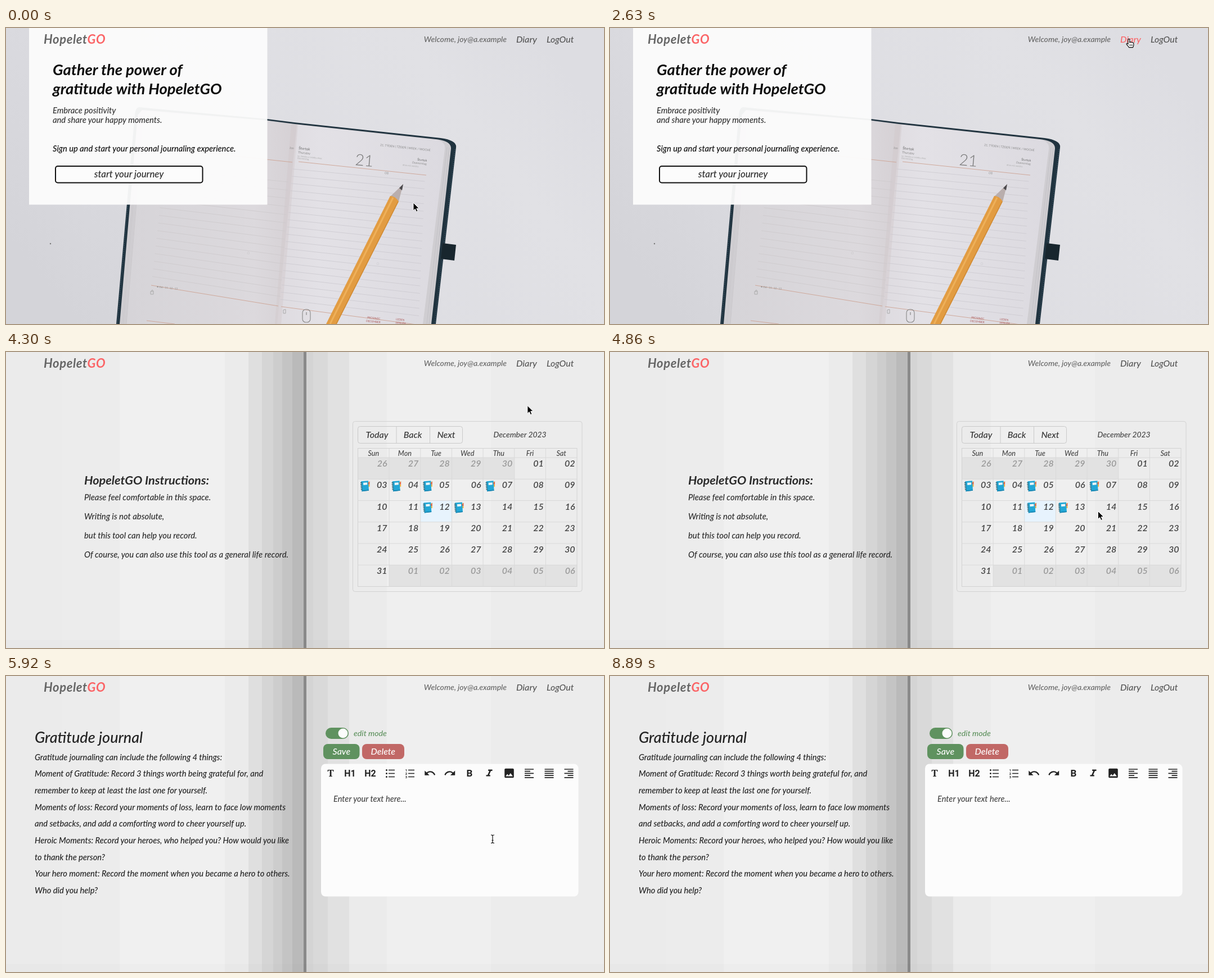
Recreate the animation shown at these times as an HTML page. Size 1063 px wide and 527 px high, loop 8940 ms.

```html
<!DOCTYPE html>
<html lang="en">
<head>
<meta charset="utf-8">
<title>Journal walkthrough</title>
<style>
  html, body { margin: 0; width: 100%; height: 100%; overflow: hidden; background: #ececec; }
  svg { display: block; width: 1063px; height: 527px; font: italic 500 15px Lato, "Open Sans", sans-serif; }
  .icon { font-family: Roboto, Inter, sans-serif; font-style: normal; font-weight: 700; }
  .serif { font-family: "Noto Serif", serif; font-style: normal; font-weight: 600; }
  .print { font-style: normal; font-weight: 400; }
</style>
</head>
<body>
<svg id="stage" viewBox="0 0 1063 527" xmlns="http://www.w3.org/2000/svg"></svg>
<script>
const LOOP = 8940;
const DIARY_AT = 2870, EVENTS_AT = 3880, JOURNAL_AT = 5920;
const HOVER_AT = 2060, BEAM_AT = 5860, GONE_AT = 8410;
const BRAND = 'Hopelet', SUFFIX = 'GO';

// time, x, y of the pointer's hot spot
const PATH = [
  [0, 724, 311], [170, 724, 311], [420, 744, 284], [750, 800, 204], [1030, 842, 134],
  [1400, 886, 65], [1840, 920, 20], [2060, 921, 19], [2300, 922, 19], [3880, 922, 22],
  [4060, 926, 55], [4300, 927, 95], [4500, 908, 175], [4750, 870, 269], [4920, 866, 291],
  [5280, 866, 291], [5400, 862, 291], [5510, 865, 291], [5859, 865, 291], [5860, 865, 290],
  [7419, 865, 290], [7420, 865, 292], [7950, 865, 292], [8130, 903, 362], [8410, 990, 527]
];

const text = (x, y, size, str, fill = '#2b2b2b', extra = '') =>
  `<text x="${x}" y="${y}" font-size="${size}" fill="${fill}" ${extra}>${str}</text>`;
const rect = (x, y, w, h, fill, extra = '') =>
  `<rect x="${x}" y="${y}" width="${w}" height="${h}" fill="${fill}" ${extra}/>`;
const path = (d, fill, extra = '') => `<path d="${d}" fill="${fill}" ${extra}/>`;
const stroke = (d, color, width = 1, extra = '') =>
  `<path d="${d}" fill="none" stroke="${color}" stroke-width="${width}" ${extra}/>`;
const group = (id, body, extra = '') => `<g id="${id}" ${extra}>${body}</g>`;
const range = n => [...Array(n).keys()];
const BOLD = 'font-weight="700"', MID = 'text-anchor="middle"', END = 'text-anchor="end"';

function ruledLines() {
  let left = '', right = '';
  for (const i of range(19)) {
    const y = 251 + i * 12.9;
    const x = 517 - (y - 170) * 0.094;
    right += `M${x} ${y}L${745 - (y - 240) * 0.045} ${y + 22 + i * 0.4}`;
  }
  for (const i of range(15)) {
    const y = 252 + i * 13.6;
    const slope = 0.1 + i * 0.004;
    const x = 281 - (y - 252) * 0.11, end = 502 - (y - 252) * 0.07;
    left += `M${x} ${y}L${end} ${y + (end - x) * slope}`;
  }
  return stroke(left, '#cdc9cc', 0.8) + stroke(right, '#cccad0', 0.8);
}

function notebook() {
  const tiny = (x, y, str, size = 5, fill = '#888', turn = 6) =>
    text(x, y, size, str, fill, `class="print" transform="rotate(${turn} ${x} ${y})"`);
  return path('M236 141L464 162 512 168 773 196Q802 200 800 213L764 527H196L229 155Q230 142 236 141Z', '#20333f')
    + stroke('M798 216L762 527M230 160L198 527', '#3b5566', 1.2, 'stroke-dasharray="1.5 2"')
    + path('M242 146L464 164.5 514 171 768 198.5Q792 202 791 215L756 527H202L234 155Z', '#cfcdd1')
    + path('M250 150L464 166 517 173 484 527H214L244 158Z', 'url(#leftPage)')
    + path('M517 172L765 199Q782 202 780 216L741 527H482Z', 'url(#rightPage)')
    + stroke('M784 212L748 527M788 213L752 527', '#c1bfc5', 0.8)
    + stroke('M227 300L208 527M233 300L214 527', '#c9c7cb', 0.8)
    + path('M507 172L519 172 489 527H478Z', '#cfc6c8', 'opacity=".4"')
    + ruledLines()
    + stroke('M280 214L509 239M520 238L747 262M258 458L484 495M489 496L737 529M250 521L300 527', '#cda393', 0.9)
    + text(620, 244, 28, '21', '#777', 'class="print" style="font-weight:300" transform="rotate(5 620 244)"')
    + tiny(665, 210, '21. TÝDEN | TŽDEŇ | WEEK / WOCHE', 5.2)
    + tiny(520, 216, 'Štvrtok', 6.4, '#666') + tiny(519, 223, 'Thursday', 5.4)
    + tiny(518, 229, 'sv. meniny a sviatky dnes', 4, '#aaa') + tiny(518, 233, 'Donnerstag', 4, '#aaa')
    + tiny(731, 236, 'Štvrtok', 5.4, '#666') + tiny(722, 241, 'Donnerstag', 5) + tiny(705, 245, 'dnes má meniny', 4, '#aaa')
    + tiny(673, 260, '08', 6, '#999') + tiny(428, 403, '◌', 8, '#aaa') + tiny(658, 422, '◌', 8, '#aaa')
    + tiny(504, 215, 'žen', 5) + tiny(268, 462, '●  tlač · 11 · 12 · 13', 4.5, '#888')
    + tiny(642, 517, 'PROSINEC', 4.8, '#a55') + tiny(640, 523, 'DECEMBER', 4.8, '#a55')
    + tiny(693, 520, 'LEDEN', 4.8, '#a55') + tiny(692, 526, 'JANUÁR', 4.8, '#a55')
    + rect(527, 501, 14, 23, 'none', 'rx="6" stroke="#888" stroke-width="1.1"') + stroke('M534 506V511', '#777')
    + stroke('M257 474v-5h5v5zM258 469q2-5 4 0M493 508v-6l4-1v7z', '#aaa')
    + path('M776 383L800 386 797 414 773 411Z', '#18262e')
    + path('M683 300L706 278 698 309Z', '#b9aead') + path('M699 285L706 278 704 289Z', '#4b494c')
    + path('M683 299Q692 299 698 309L588 527H569Z', '#e29c42')
    + stroke('M688 302L576 527', '#eeb05a', 3) + stroke('M697 309L587 527', '#cf8b36', 1.5);
}

function home() {
  return rect(0, 0, 1063, 527, 'url(#desk)') + notebook()
    + `<circle cx="79" cy="384" r="1.2" fill="#777"/>`
    + rect(41, 0, 423.5, 314.5, '#fcfcfc', 'opacity=".95"')
    + text(83, 84, 27.4, 'Gather the power of', '#0c0c0c', BOLD)
    + text(83, 118, 27.4, `gratitude with ${BRAND}${SUFFIX}`, '#0c0c0c', BOLD)
    + text(83, 152, 14.7, 'Embrace positivity', '#333') + text(83, 169, 14.7, 'and share your happy moments.', '#333')
    + text(83, 220, 14.65, 'Sign up and start your personal journaling experience.', '#0c0c0c')
    + rect(88, 246, 261.5, 29.5, '#fcfcfc', 'rx="4" stroke="#111" stroke-width="2"')
    + text(218.5, 266, 16.8, 'start your journey', '#2b2b2b', MID);
}

function pages() {
  const bands = [
    [0, '#ebebeb'], [100, '#ececec'], [202, '#f0f0f0'], [389, '#ebebeb'], [431, '#dfdfdf'], [455, '#d5d5d5'],
    [475, '#cdcdcd'], [491, '#c4c4c4'], [509, '#bababa'], [529, '#8a8a8a'], [534, '#d4d4d4'], [546, '#d9d9d9'],
    [572, '#e1e1e1'], [610, '#ebebeb'], [677, '#efefef'], [862, '#ececec'], [1063]
  ];
  return bands.slice(0, -1).map(([x, c], i) => rect(x, 0, bands[i + 1][0] - x, 527, c)).join('')
    + rect(0, 513, 1063, 14, '#000', 'opacity=".012"');
}

const colX = c => 625.5 + c * 55.64;
const rowY = r => 188 + r * 38.25;

function calendar() {
  const tone = '#d2d2d2';
  let days = '', fills = '', books = '';
  for (const i of range(42)) {
    const c = i % 7, r = Math.floor(i / 7);
    const out = i < 5 || i > 35;
    const n = i < 5 ? 26 + i : i > 35 ? i - 35 : i - 4;
    if (out || n === 12) fills += rect(colX(c), rowY(r), 55.64, 38.25, out ? '#e2e2e2' : '#e7f3fd');
    days += text(colX(c + 1) - 3.5, rowY(r) + 16, 16, String(n).padStart(2, '0'), out ? '#999' : '#444', END + ' font-weight="600"');
    if (!out && [3, 4, 5, 7, 12, 13].includes(n))
      books += `<use href="#book" x="${colX(c) + 2.5}" y="${rowY(r) + 1.5}"/>`;
  }
  const grid = range(6).map(c => `M${colX(c + 1)} 171.5V417.5`).join('') + range(6).map(r => `M625.5 ${rowY(r)}H1015`).join('');
  const heads = ['Sun', 'Mon', 'Tue', 'Wed', 'Thu', 'Fri', 'Sat']
    .map((d, c) => text(colX(c + 0.5), 184.5, 12.7, d, '#444', MID)).join('');
  const lines = ['Please feel comfortable in this space.', 'Writing is not absolute,', 'but this tool can help you record.',
    'Of course, you can also use this tool as a general life record.'];
  return text(139, 236, 21.7, `${BRAND}${SUFFIX} Instructions:`, '#2b2b2b', BOLD)
    + lines.map((s, i) => text(139, 264 + i * 34, 14.8, s)).join('')
    + rect(616.5, 123.5, 407.5, 303, 'none', `rx="4" stroke="${tone}"`)
    + rect(625.5, 132.5, 186, 30, 'none', 'rx="4" stroke="#c9c9c9"') + stroke('M694 132.5V162.5M753.5 132.5V162.5', '#c9c9c9')
    + text(659.5, 153, 16, 'Today', '#333', MID) + text(723, 153, 16, 'Back', '#333', MID) + text(782.5, 153, 16, 'Next', '#333', MID)
    + text(913.5, 152, 13.9, 'December 2023', '#444', MID)
    + fills + rect(625.5, 171.5, 389.5, 246, 'none', `stroke="${tone}"`) + stroke(grid, '#d9d9d9')
    + heads + days + group('events', books);
}

function toolbar() {
  const ink = '#222';
  const rules = (x, widths, side) => stroke(widths.map((w, i) => {
    const from = side === 'end' ? x + 8 - w : x - 8;
    return `M${from} ${166 + i * 3.7}h${w}`;
  }).join(''), ink, 1.7);
  const glyph = (x, d, flip = 1) => path(d, ink, `transform="translate(${x} 173) scale(${0.92 * flip} .92) translate(-12 -12)"`);
  const undo = 'M12.5 8c-2.65 0-5.05.99-6.9 2.6L2 7v9h9l-3.62-3.62c1.39-1.16 3.16-1.88 5.12-1.88 3.54 0 6.55 2.31 7.6 5.5l2.37-.78C21.08 11.03 17.15 8 12.5 8z';
  const slant = 'M10 5v2.6h2.2l-3.4 7.8H6V18h8v-2.6h-2.2l3.4-7.8H18V5z';
  const picture = 'M21 19V5c0-1.1-.9-2-2-2H5c-1.1 0-2 .9-2 2v14c0 1.1.9 2 2 2h14c1.1 0 2-.9 2-2zM8.5 13.5l2.5 3L14.5 12l4.5 6H5z';
  const label = (x, s, size, cls = 'icon') => text(x, 179, size, s, ink, `${MID} class="${cls}"`);
  const items = 'M680 167.5h11M680 173.5h11M680 179.5h11';
  return label(577, 'T', 17, 'serif') + label(611.5, 'H1', 16) + label(647.5, 'H2', 16)
    + stroke(items, ink, 1.7) + range(3).map(i => `<circle cx="676.5" cy="${167.5 + i * 6}" r="1.5" fill="${ink}"/>`).join('')
    + stroke(items, ink, 1.7, 'transform="translate(35)"')
    + range(3).map(i => text(711.5, 169.5 + i * 6, 6, i + 1, ink, `${MID} class="icon"`)).join('')
    + glyph(753.5, undo) + glyph(789, undo, -1)
    + label(824, 'B', 17) + glyph(859, slant) + glyph(894.5, picture)
    + rules(930, [16, 10, 16, 10, 16]) + rules(965.5, [16, 16, 16, 16, 16]) + rules(1000.5, [16, 10, 16, 10, 16], 'end');
}

function journal() {
  const lines = ['Gratitude journaling can include the following 4 things:',
    'Moment of Gratitude: Record 3 things worth being grateful for, and', 'remember to keep at least the last one for yourself.',
    'Moments of loss: Record your moments of loss, learn to face low moments', 'and setbacks, and add a comforting word to cheer yourself up.',
    'Heroic Moments: Record your heroes, who helped you? How would you like', 'to thank the person?',
    'Your hero moment: Record the moment when you became a hero to others.', 'Who did you help?'];
  const green = '#5f925f';
  return text(51, 119, 27, 'Gratitude journal', '#222')
    + lines.map((s, i) => text(51, 149.5 + i * 29.7, 14.65, s, '#222')).join('')
    + rect(568, 92, 41, 20, green, 'rx="10"') + '<circle cx="599" cy="102" r="8.5" fill="#fcfcfc"/>'
    + text(618, 106.5, 14.2, 'edit mode', green)
    + rect(564, 121, 64.5, 27, green, 'rx="8"') + text(596.3, 140, 16, 'Save', '#fff', MID)
    + rect(633, 121, 75, 27, '#c16866', 'rx="8"') + text(670.3, 140, 16, 'Delete', '#fff', MID)
    + rect(560, 156.5, 457.5, 236, '#fcfcfc', 'rx="8"') + toolbar()
    + text(582, 224, 14.6, 'Enter your text here...', '#444')
    + rect(581.5, 213, 1.2, 17, '#222', 'id="caret"');
}

const defs = `<defs>
  <linearGradient id="desk" x1="0" y1=".7" x2="1" y2=".3"><stop stop-color="#d4d4d9"/><stop offset=".4" stop-color="#dddde2"/><stop offset=".8" stop-color="#e1e1e5"/><stop offset="1" stop-color="#dddde2"/></linearGradient>
  <linearGradient id="leftPage"><stop stop-color="#d6d4d8"/><stop offset=".75" stop-color="#dcd9dd"/><stop offset="1" stop-color="#d5d0d4"/></linearGradient>
  <linearGradient id="rightPage"><stop stop-color="#dedbe0"/><stop offset=".25" stop-color="#e3e1e6"/><stop offset="1" stop-color="#dcdae0"/></linearGradient>
  <g id="book">
    <path d="M16 4h2.5v4H16z" fill="#e2574c"/><path d="M16 8h2.5v4H16z" fill="#f2b33d"/>
    <path d="M3 2.5L16 1.5 17 19 4.5 20.5Z" fill="#22a7d6"/><path d="M4.5 20.5L17 19V17.5L4.5 19Z" fill="#1780ab"/>
    <path d="M7 5L14 4.4 14.3 8.6 7.3 9.2Z" fill="#eef6f8"/>
    <path d="M2 5h3M2 8h3M2.3 11h3M2.5 14h3M2.8 17h3" stroke="#35626f" stroke-width="1.3"/>
    <path d="M15.5 6L18.5 3" stroke="#d98a4a" stroke-width="1.5"/>
  </g>
</defs>`;

const nav = text(67, 28, 22, `${BRAND}<tspan fill="#fb6466">${SUFFIX}</tspan>`, '#666', BOLD + ' letter-spacing=".6"')
  + text(890, 25, 14, 'Welcome, joy@a.example', '#666', END)
  + text(907, 25.5, 16.2, 'Diary', '#555', 'id="link"') + text(961, 25.5, 15.7, 'LogOut', '#555');

const beamShape = 'M-3-7Q0-7 0-5.5Q0-7 3-7M0-5.5V6M-3 7.5Q0 7.5 0 6Q0 7.5 3 7.5M-1.5 2.5H1.5';
const pointers =
  group('arrow', path('M0 0V14.2L3.3 11.2 5.5 16.2 8 15.1 5.8 10.2H10.2Z', '#000', 'stroke="#fff" stroke-width="1"'))
  + group('hand', path('M-1 1.6Q-1-.2 .4-.2T1.8 1.6V6Q3 4.6 4.4 6 5.8 5 6.8 6.6 8.6 6 8.8 8V11Q8.6 13 7.4 15H.6Q-.8 12.8-3.6 9.8-4.6 8-2.8 7.6L-1 9Z', '#fff', 'stroke="#000" stroke-width="1.1"')
    + stroke('M2 9.5v3M4.2 9.5v3M6.3 9.5v3', '#000', 0.8))
  + group('beam', stroke(beamShape, '#fff', 2.4, 'opacity=".8"') + stroke(beamShape, '#111', 1.2));

const stage = document.getElementById('stage');
stage.innerHTML = defs + group('home', home()) + group('pages', pages()) + group('calendar', calendar())
  + group('journal', journal()) + nav + group('pointer', pointers);

const part = id => document.getElementById(id);
const toggle = (id, on) => { part(id).style.display = on ? '' : 'none'; };

function position(t) {
  const k = PATH.findIndex(p => p[0] > t);
  if (k < 0) return PATH[PATH.length - 1].slice(1);
  const [t0, x0, y0] = PATH[k - 1], [t1, x1, y1] = PATH[k];
  const f = (t - t0) / (t1 - t0);
  return [x0 + (x1 - x0) * f, y0 + (y1 - y0) * f];
}

function draw(t) {
  const [x, y] = position(t);
  const hover = t >= HOVER_AT && t < EVENTS_AT;
  const beam = t >= BEAM_AT && y < 393;
  toggle('home', t < DIARY_AT);
  toggle('pages', t >= DIARY_AT);
  toggle('calendar', t >= DIARY_AT && t < JOURNAL_AT);
  toggle('journal', t >= JOURNAL_AT);
  toggle('events', t >= EVENTS_AT);
  toggle('pointer', t < GONE_AT);
  toggle('caret', (t >= 7650 && t < 8180) || (t >= 8710 && t < 8890));
  toggle('hand', hover);
  toggle('beam', beam);
  toggle('arrow', !hover && !beam);
  part('link').setAttribute('fill', hover ? '#fb6466' : '#555');
  part('pointer').setAttribute('transform', `translate(${x.toFixed(1)} ${y.toFixed(1)})`);
}

const start = performance.now();
function tick() {
  draw((performance.now() - start) % LOOP);
  requestAnimationFrame(tick);
}
tick();
</script>
</body>
</html>
```
